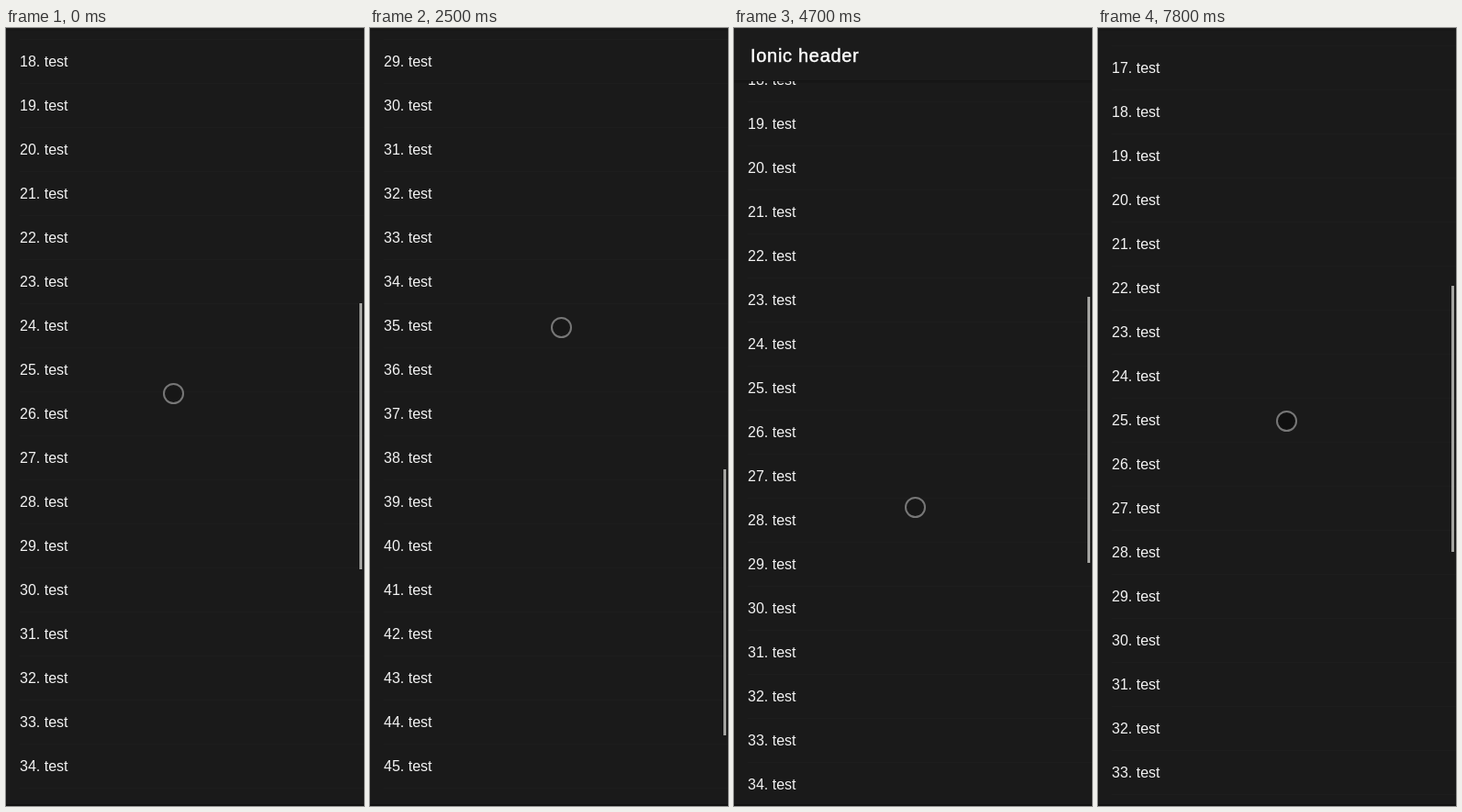
Write an HTML page that moves like this. It is 390x848 px and loops after 8000 ms.

```html
<!DOCTYPE html>
<html lang="en">
<head>
<meta charset="utf-8">
<title>Collapsing header</title>
<style>
  html, body { margin: 0; width: 100%; height: 100%; overflow: hidden; background: #1a1a1a; }
  svg { display: block; width: 100%; height: 100%; }
  text { font-family: "Liberation Sans", Arial, sans-serif; font-size: 16px; fill: #f4f4f4; }
  .title { font-size: 20px; letter-spacing: .7px; fill: #fff; stroke: #fff; stroke-width: .45px; }
</style>
</head>
<body>
<svg viewBox="0 0 390 848">
  <rect width="390" height="848" fill="#1a1a1a"/>
  <g id="list"></g>
  <g id="header">
    <rect width="390" height="57" fill="#1b1b1b"/>
    <rect y="57" width="390" height="1" fill="#141414"/>
    <rect y="58" width="390" height="2" fill="#000" opacity=".1"/>
    <text class="title" x="18" y="37">Ionic header</text>
  </g>
  <rect width="390" height="1" fill="#202020"/>
  <rect y="846" width="390" height="2" fill="#121212"/>
  <rect id="bar" x="385" width="3" height="290" fill="#a3a3a0"/>
  <circle id="touch" r="10.5" stroke="#777" stroke-width="2"/>
</svg>
<script>
const LOOP = 8000, STEP = 100, ROW = 48, HEADER = 57;
const $ = id => document.getElementById(id);
const list = $('list'), header = $('header'), bar = $('bar'), touch = $('touch');

const linear = u => u;
const smooth = u => u * u * (3 - 2 * u);
const power = p => u => u ** p;
const decay = k => u => (1 - Math.exp(-k * u)) / (1 - Math.exp(-k));

// time, scroll, touch x, touch y, easing into this key
const keys = [
  [0, 828, 182, 398],
  [500, 1040, 190, 322, decay(3)],
  [1000, 964, 200, 398, smooth],
  [1300, 964, 200, 398, linear],
  [1700, 1004, 203, 358, power(1.5)],
  [1900, 1100, 207, 262, power(1.3)],
  [2500, 1356, 208, 326, decay(0.8)],
  [3100, 1455, 203, 439, decay(1.5)],
  [3400, 1394, 201, 500, linear],
  [3700, 1394, 201, 500, linear],
  [3800, 1391, 201, 503, linear],
  [4100, 1270, 204, 624, power(2)],
  [5500, 711, 196, 500, decay(3.86)],
  [5700, 699, 197, 504, linear],
  [5800, 699, 197, 504, linear],
  [6400, 742, 208, 461, smooth],
  [6500, 742, 208, 461, linear],
  [6700, 746, 208, 457, linear],
  [7800, 773, 205, 428, linear],
  [8000, 773, 205, 428, linear]
];
const presses = [[500, 1900], [3100, 3700], [3900, 4100], [5800, 8000]];

function pose(t) {
  const i = Math.max(1, keys.findIndex(k => k[0] >= t));
  const a = keys[i - 1], b = keys[i];
  const u = b[4]((t - a[0]) / (b[0] - a[0]));
  return [1, 2, 3].map(c => a[c] + (b[c] - a[c]) * u);
}

// The header follows each scroll change within its own height.
function hiddenPart(t) {
  let hidden = HEADER, last = pose(0)[0];
  for (let s = STEP; s <= t; s += STEP) {
    const now = pose(s)[0];
    hidden = Math.min(HEADER, Math.max(0, hidden + now - last));
    last = now;
  }
  return hidden;
}

for (let n = 1; n <= 50; n++) {
  list.innerHTML += `<text x="15" y="${n * ROW + 6}">${n}. test</text>` +
    `<rect x="15" y="${n * ROW + 24}" width="375" height="1" fill="#1d1d1d"/>`;
}

function render(time) {
  const t = Math.floor((time % LOOP) / STEP) * STEP;
  const [scroll, x, y] = pose(t).map(Math.round);
  const down = presses.some(([from, to]) => t > from && t < to);
  list.setAttribute('transform', `translate(0 ${-scroll})`);
  header.setAttribute('transform', `translate(0 ${-Math.round(hiddenPart(t))})`);
  bar.setAttribute('y', Math.round(300.3 + (scroll - 828) * 0.3425));
  touch.setAttribute('cx', x + .5);
  touch.setAttribute('cy', y + .5);
  touch.setAttribute('fill', down ? '#101010' : '#171717');
}

let start;
function tick(now) {
  start ??= now;
  render(now - start);
  requestAnimationFrame(tick);
}
render(0);
requestAnimationFrame(tick);
</script>
</body>
</html>
```
